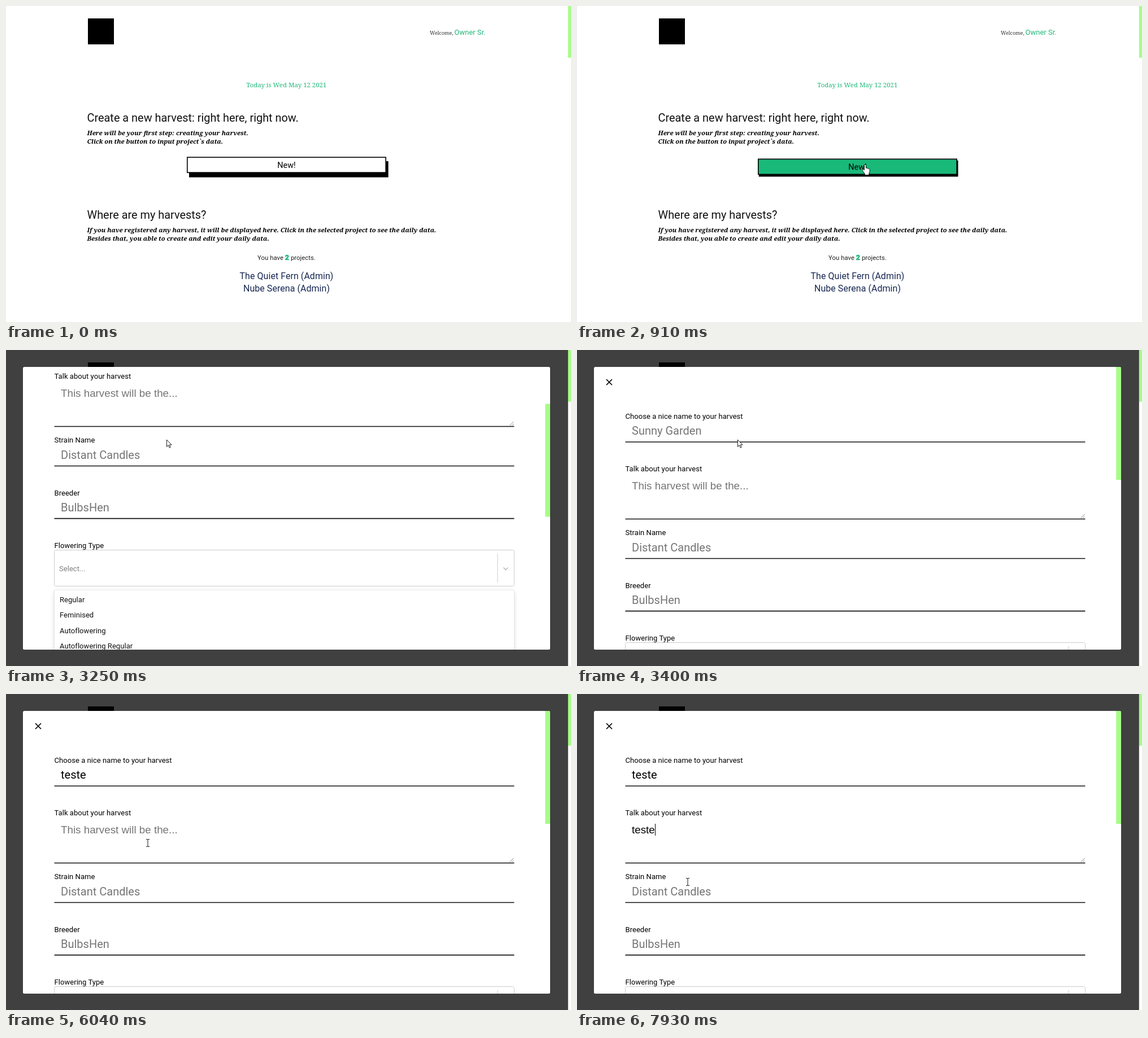
An HTML page for the animation above (8000 ms loop, 1000 by 560 pixels).

```html
<!DOCTYPE html>
<html lang="en">
<head>
<meta charset="utf-8">
<title>Harvest form</title>
<style>
  html, body { margin: 0; width: 100%; height: 100%; overflow: hidden; background: #fff; }
  svg { position: absolute; left: 0; top: 0; display: block; }
  text { white-space: pre; }

  .sans { font-family: Roboto, sans-serif; }
  .serif { font-family: "Noto Serif", serif; }
  .green { fill: #1fb97a; }
  .heading { font-size: 19.9px; fill: #111; }
  .note { font: italic 700 11.17px "Noto Serif", serif; }
  .link { font-size: 16px; letter-spacing: .05px; fill: #172852; }
  .mid { text-anchor: middle; }
  .label { font-size: 13px; letter-spacing: .05px; }
  .hint { font-size: 20px; fill: #757575; }
  .area { font: 18.8px "Liberation Sans", sans-serif; }
  .rule { stroke: #111; stroke-width: 1.7; }
  .bar { fill: #a5fd86; }

  /* Every part shares one 8 s clock and holds its value between keys. */
  .anim, .typed::before { animation: 8s step-end infinite; }

  .button { animation-name: press; }
  .shadow { animation-name: shadow; }
  .face { animation-name: hover; }
  .modal { animation-name: open; }
  .content { animation-name: scroll; }
  .thumb { animation-name: thumb; }
  .hint1 { animation-name: hint1; }
  .hint2 { animation-name: hint2; }
  .cursor { animation-name: move; }
  .arrow { animation-name: arrow; }
  .hand { animation-name: hand; }
  .beam { animation-name: beam; }

  @keyframes press {
    0% { transform: none; }
    10.375% { transform: translateY(1.7px); }
    11.375%, 100% { transform: translateY(3.2px); }
  }
  @keyframes shadow {
    0% { transform: none; }
    10.375% { transform: translate(-1px, -.5px); }
    11.375%, 100% { transform: translate(-2.2px, -1.2px); }
  }
  @keyframes hover {
    0% { fill: #fff; }
    7.625% { fill: #8cdcbc; }
    8.5%, 100% { fill: #19b979; }
  }
  @keyframes open {
    0% { opacity: 0; }
    28.75%, 100% { opacity: 1; }
  }
  @keyframes scroll {
    0% { transform: translateY(-176px); }
    40.625% { transform: translateY(-164px); }
    41.625% { transform: translateY(-70px); }
    42.5%, 100% { transform: none; }
  }
  @keyframes thumb {
    0% { transform: translateY(70px); }
    40.625% { transform: translateY(65.5px); }
    41.625% { transform: translateY(28px); }
    42.5%, 100% { transform: none; }
  }
  @keyframes hint1 {
    0% { opacity: 1; }
    56.25%, 100% { opacity: 0; }
  }
  @keyframes hint2 {
    0% { opacity: 1; }
    86.375%, 100% { opacity: 0; }
  }

  @keyframes move {
    0% { transform: translate(836px, 458px); }
    .875% { transform: translate(836px, 458px); animation-timing-function: steps(4, end); }
    4.75% { transform: translate(620px, 345px); animation-timing-function: steps(4, end); }
    8.5% { transform: translate(510px, 281px); }
    28.75% { transform: translate(512px, 281px); }
    33.75% { transform: translate(512px, 281px); animation-timing-function: steps(7, start); }
    40.625% { transform: translate(284px, 159px); }
    47.25% { transform: translate(283px, 157px); }
    49.375% { transform: translate(287px, 159px); }
    50.25% { transform: translate(283px, 157px); }
    64.875% { transform: translate(283px, 157px); animation-timing-function: steps(6, start); }
    70.75% { transform: translate(251px, 233px); }
    75.5% { transform: translate(251px, 264px); animation-timing-function: steps(4, end); }
    79.375% { transform: translate(242px, 251px); }
    81.5% { transform: translate(242px, 248px); }
    82.375% { transform: translate(242px, 245px); }
    89.25% { transform: translate(233px, 241px); }
    95% { transform: translate(233px, 241px); animation-timing-function: steps(5, start); }
    100% { transform: translate(196px, 333px); }
  }
  @keyframes arrow {
    0% { opacity: 0; }
    .875% { opacity: 1; }
    7.625% { opacity: 0; }
    34.75% { opacity: 1; }
    47.25%, 100% { opacity: 0; }
  }
  @keyframes hand {
    0% { opacity: 0; }
    7.625% { opacity: 1; }
    28.75%, 100% { opacity: 0; }
  }
  @keyframes beam {
    0% { opacity: 0; }
    28.75% { opacity: 1; }
    34.75% { opacity: 0; }
    47.25%, 100% { opacity: 1; }
  }

  /* The right border of the growing word is the text caret. */
  .typed { position: absolute; left: 97px; color: #000; }
  .typed::before {
    content: "";
    display: inline-block;
    vertical-align: top;
    border-right: 1px solid transparent;
  }
  .name { top: 132px; font-size: 20px; line-height: 23px; }
  .name::before { height: 23px; animation-name: typeName; }
  .story { top: 230px; line-height: 21px; }
  .story::before { height: 21px; animation-name: typeStory; }

  @keyframes typeName {
    0% { content: ""; border-color: transparent; }
    49.375% { content: ""; border-color: #000; }
    56.25% { content: "te"; border-color: #000; }
    58.125% { content: "tes"; border-color: #000; }
    59.125% { content: "test"; border-color: #000; }
    60.125% { content: "teste"; border-color: #000; }
    66.125%, 100% { content: "teste"; border-color: transparent; }
  }
  @keyframes typeStory {
    0% { content: ""; border-color: transparent; }
    86.375% { content: "te"; border-color: #000; }
    87.375% { content: "tes"; border-color: #000; }
    93.125% { content: "tes"; border-color: transparent; }
    95% { content: "test"; border-color: #000; }
    96%, 100% { content: "teste"; border-color: #000; }
  }
</style>
</head>
<body>
<svg class="sans" width="1000" height="560" viewBox="0 0 1000 560">
  <defs>
    <clipPath id="sheet"><rect x="30" y="30" width="933" height="501" rx="2.5"/></clipPath>
    <filter id="soft" x="-5%" y="-20%" width="110%" height="140%">
      <feDropShadow dx="0" dy="3" stdDeviation="3" flood-opacity=".14"/>
    </filter>
  </defs>

  <g class="page">
    <rect x="145" y="22" width="46" height="46"/>
    <text class="serif" x="750" y="50.5" font-size="9" fill="#333">Welcome,</text>
    <text class="green" x="793.5" y="50.5" font-size="13">Owner Sr.</text>
    <text class="serif green mid" x="496.3" y="144" font-size="11.4">Today is Wed May 12 2021</text>

    <text class="heading" x="143.5" y="204.5">Create a new harvest: right here, right now.</text>
    <text class="note" x="143.5" y="228.5">Here will be your first step: creating your harvest.</text>
    <text class="note" x="143.5" y="244">Click on the button to input project`s data.</text>

    <rect class="anim shadow" x="324" y="275" width="352.7" height="28.6"/>
    <g class="anim button">
      <rect class="anim face" x="320.8" y="268.1" width="351.4" height="27" fill="#fff" stroke="#000" stroke-width="1.6"/>
      <text class="mid" x="496.5" y="286.7" font-size="14.4">New!</text>
    </g>

    <text class="heading" x="143.5" y="376.5">Where are my harvests?</text>
    <text class="note" x="143.5" y="400.5">If you have registered any harvest, it will be displayed here. Click in the selected project to see the daily data.</text>
    <text class="note" x="143.5" y="416">Besides that, you able to create and edit your daily data.</text>

    <text class="mid" x="496.5" y="449.7" font-size="11.4" fill="#222">You have <tspan class="green" font-weight="900" font-size="12.5" stroke="#1fb97a" stroke-width=".6">2</tspan> projects.</text>
    <text class="link mid" x="496.5" y="483.5">The Quiet Fern (Admin)</text>
    <text class="link mid" x="496.5" y="506.3">Nube Serena (Admin)</text>
  </g>
  <rect class="bar" x="994.8" width="5.2" height="91.7"/>

  <g class="anim modal">
    <rect width="994.8" height="560" fill-opacity=".75"/>
    <g clip-path="url(#sheet)">
      <rect x="30" y="30" width="933" height="501" fill="#fff"/>
      <g class="anim content">
        <path d="M52 52l10 10m0-10l-10 10" stroke="#000" stroke-width="1.7"/>

        <text class="label" x="85.5" y="121.7">Choose a nice name to your harvest</text>
        <text class="hint anim hint1" x="97" y="150.3">Sunny Garden</text>
        <path class="rule" d="M85.5 163h814"/>

        <text class="label" x="85.5" y="215.2">Talk about your harvest</text>
        <text class="hint area anim hint2" x="97" y="247">This harvest will be the...</text>
        <path d="M891.5 298l7-7m-3 7l3-3" stroke="#777" stroke-width=".9"/>
        <path class="rule" d="M85.5 299.5h814"/>

        <text class="label" x="85.5" y="328.2">Strain Name</text>
        <text class="hint" x="97" y="356.8">Distant Candles</text>
        <path class="rule" d="M85.5 369.5h814"/>

        <text class="label" x="85.5" y="421.5">Breeder</text>
        <text class="hint" x="97" y="450">BulbsHen</text>
        <path class="rule" d="M85.5 462.7h814"/>

        <text class="label" x="85.5" y="515">Flowering Type</text>
        <rect x="85.5" y="518.5" width="814" height="64" rx="3" fill="#fff" stroke="#ccc"/>
        <text class="label" x="94" y="556" fill="#808080">Select...</text>
        <path d="M870 525v51" stroke="#ccc"/>
        <path d="M880.5 549.5l4 4 4-4" fill="none" stroke="#bbb" stroke-width="1.7"/>

        <rect x="85.5" y="589" width="814" height="150" rx="3" fill="#fff" stroke="#e2e2e2" stroke-width=".8" filter="url(#soft)"/>
        <g class="label" fill="#111">
          <text x="95" y="610.7">Regular</text>
          <text x="95" y="638.2">Feminised</text>
          <text x="95" y="665.7">Autoflowering</text>
          <text x="95" y="693.2">Autoflowering Regular</text>
        </g>
      </g>
      <rect class="bar anim thumb" x="954.3" y="30" width="8.7" height="200"/>
    </g>
  </g>

  <g class="anim cursor" stroke="#000" stroke-width=".9" stroke-linejoin="round" fill="#fff">
    <path class="anim arrow" d="M.4 0v12.4l2.9-2.7 2 4.6 1.9-.9-2-4.4h3.9z"/>
    <path class="anim hand" d="M-1.5 9.5V1.4a1.5 1.5 0 013 0V6l1.7.2 1.7.6 1.7.5 1.6 1v4.2l-1.4 3.2v2.8H-.5v-2L-3.5 12.5-5 10c-.5-1.4 1-2 2-1z"/>
    <path class="anim beam" fill="none" d="M-3-6.5h2l1 .7 1-.7h2M0-6V6M-3 6.5h2l1-.7 1 .7h2"/>
  </g>
</svg>
<div class="typed name sans"></div>
<div class="typed area story"></div>
</body>
</html>
```
